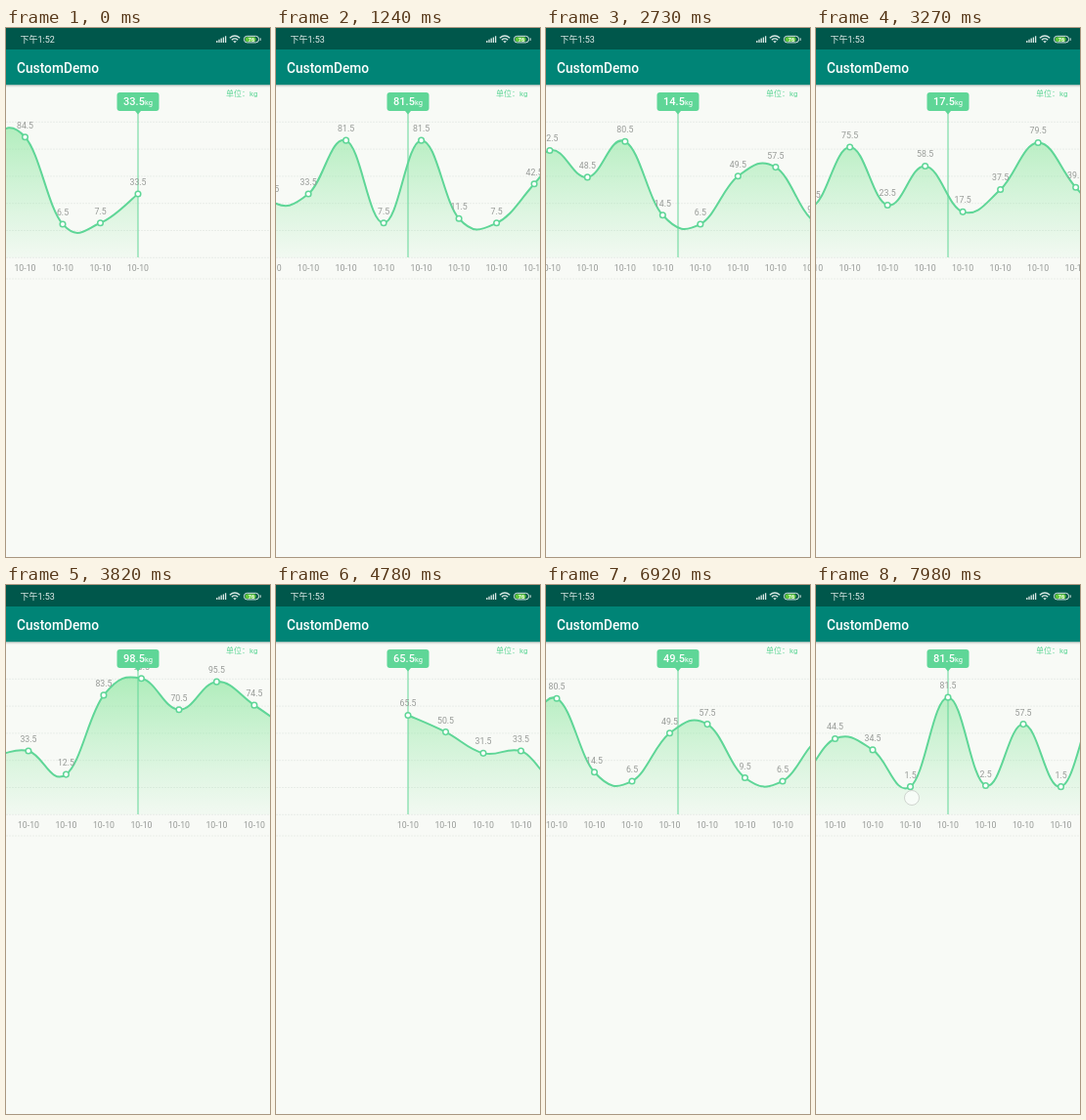
Recreate the animation shown at these times as an HTML page. Size 270 by 542 pixels, loop 8000 ms.

```html
<!DOCTYPE html>
<html lang="zh">
<head>
<meta charset="utf-8">
<title>CustomDemo</title>
<style>
  html, body { margin: 0; width: 100%; height: 100%; overflow: hidden; background: #f8faf6; }
  svg { display: block; width: 100%; height: 100%; }
  text { font-family: Roboto, "Noto Sans CJK SC", "Noto Sans CJK", sans-serif; }
  .label { font-size: 8.75px; fill: #979a97; text-anchor: middle; }
  .dot { fill: #fff; stroke: #5fd697; stroke-width: 1.5; }
  .curve { fill: none; stroke: #5fd697; stroke-width: 2; stroke-linejoin: round; }
  .grid { stroke: #e3e9e2; stroke-width: .7; stroke-dasharray: 2 1; }
</style>
</head>
<body>
<svg viewBox="0 0 270 542" preserveAspectRatio="none">
  <defs>
    <linearGradient id="fade" gradientUnits="userSpaceOnUse" x1="0" y1="96" x2="0" y2="235">
      <stop offset="0" stop-color="#7fe494" stop-opacity=".6"/>
      <stop offset="1" stop-color="#8ee8a4" stop-opacity=".06"/>
    </linearGradient>
    <linearGradient id="shade" x1="0" y1="0" x2="0" y2="1">
      <stop offset="0" stop-opacity=".2"/>
      <stop offset="1" stop-opacity="0"/>
    </linearGradient>
  </defs>

  <rect width="270" height="542" fill="#f8faf6"/>
  <g id="grid"></g>

  <g class="scroll"><path id="area" fill="url(#fade)"/></g>
  <path d="M135 87V235" stroke="#5fd697" stroke-width="1.5" opacity=".65"/>
  <g class="scroll" id="chart"><path id="curve" class="curve"/></g>

  <rect x="113.5" y="66" width="43" height="19" rx="3" fill="#5fd697"/>
  <path d="M132 85h6l-3 3.5z" fill="#5fd697"/>
  <text x="135" y="79.3" fill="#fff" text-anchor="middle" font-size="11" font-weight="500"><tspan id="value">33.5</tspan><tspan font-size="7.5" font-weight="400">kg</tspan></text>
  <text x="225" y="70" font-size="8" fill="#5fd697">单位：kg</text>

  <circle id="touch" cx="98" cy="218" r="7.5" fill="#fff" fill-opacity=".6" stroke="#c6cbc6" stroke-width=".8"/>

  <rect y="58" width="270" height="3" fill="url(#shade)"/>
  <rect y="21" width="270" height="37.2" fill="#008476"/>
  <rect width="270" height="22" fill="#00574b"/>
  <text x="11" y="45.9" fill="#fff" font-size="13.75" font-weight="500">CustomDemo</text>
  <text id="clock" x="14.5" y="15" fill="#e6efed" font-size="9">下午1:52</text>

  <g stroke="#dce9e6" fill="none">
    <path d="M215.8 15v-2M218 15v-3.2M220.2 15v-4.4M222.4 15v-5.6M224.6 15v-6.8" stroke-width="1.3"/>
    <path d="M228.8 10.2q5.2-4.4 10.4 0M230.8 12.2q3.2-2.6 6.4 0" stroke-width="1.3"/>
    <path d="M232.2 13.3h3.6L234 15.4z" fill="#dce9e6" stroke="none"/>
    <rect x="243.5" y="8.3" width="15" height="6.6" rx="3" stroke-width="1"/>
    <path d="M260.2 10.3v2.6" stroke-width="1"/>
  </g>
  <rect x="244.6" y="9.2" width="11" height="4.8" rx="2" fill="#62c93c"/>
  <text x="251" y="13.6" fill="#fff" font-size="5.5" font-weight="700" text-anchor="middle">76</text>
</svg>
<script>
const LOOP = 8000, COUNT = 51, STEP = 38.5, CENTER = 135, BASE = 235, BEND = .2;

// Labelled readings by first item; the items between come from the generator
const stretches = {
  0: [65, 50, 31, 33, 12, 83, 98, 70, 95, 74],
  12: [75, 23, 58, 17, 37, 79, 39],
  21: [72, 48, 80, 14, 6, 49, 57, 9],
  30: [44, 34, 1, 81, 2, 57, 1, 75, 27, 33, 81, 7, 81, 11, 7, 42],
  47: [84, 6, 7, 33]
};
const generated = i => (14 * i * i + 78 * i + 70) % 100;

const kilos = Array.from({ length: COUNT }, (_, i) => generated(i));
for (const first in stretches) kilos.splice(first, stretches[first].length, ...stretches[first]);

// Key moments of the scroll: time in ms and the item at the centre line
const keys = [[690, 50], [1240, 41.66], [2730, 24.42], [3820, 5.92], [4780, 0], [5570, 2.4], [6160, 15.04], [7800, 33]];

const $ = id => document.getElementById(id);
const near = (list, i) => list[Math.max(0, Math.min(list.length - 1, i))];
const reading = i => `${kilos[i]}.5`;

function add(parent, tag, attrs, text = '') {
  const node = document.createElementNS('http://www.w3.org/2000/svg', tag);
  for (const key in attrs) node.setAttribute(key, attrs[key]);
  node.textContent = text;
  parent.append(node);
}

const addGridLine = y => add($('grid'), 'path', { class: 'grid', d: `M0 ${y}H270` });
for (let i = 0; i < 6; i++) addGridLine(96.3 + i * 27.8);
addGridLine(257);

const points = kilos.map((v, i) => [i * STEP, 207.8 - v * 1.1436]);

// Smooth curve whose tangents follow the neighbouring points
function smoothPath() {
  let d = `M${points[0]}`;
  for (let i = 0; i < COUNT - 1; i++) {
    const [a, b, c, e] = [-1, 0, 1, 2].map(k => near(points, i + k));
    const c1 = b.map((p, k) => p + (c[k] - a[k]) * BEND);
    const c2 = c.map((p, k) => p - (e[k] - b[k]) * BEND);
    d += `C${c1} ${c2} ${c}`;
  }
  return d;
}

const path = smoothPath();
$('curve').setAttribute('d', path);
$('area').setAttribute('d', `${path}V${BASE}H0Z`);
points.forEach(([x, y], i) => {
  add($('chart'), 'circle', { class: 'dot', cx: x, cy: y, r: 2.8 });
  add($('chart'), 'text', { class: 'label', x, y: y - 9 }, reading(i));
  add($('chart'), 'text', { class: 'label', x, y: 249.2 }, '10-10');
});

// Mean speed between two keys, and the speed at a key: zero at ends and turns
function pace(i) {
  const [t0, p0] = near(keys, i), [t1, p1] = near(keys, i + 1);
  return t1 > t0 ? (p1 - p0) / (t1 - t0) : 0;
}
function speedAt(i) {
  const before = pace(i - 1), after = pace(i);
  const isEnd = i === 0 || i === keys.length - 1;
  return isEnd || before * after <= 0 ? 0 : 2 * before * after / (before + after);
}

function positionAt(t) {
  const next = keys.findIndex(([time]) => time > t);
  if (next < 1) return next ? keys[keys.length - 1][1] : keys[0][1];
  const [t0, p0] = keys[next - 1], [t1, p1] = keys[next];
  const span = t1 - t0, u = (t - t0) / span, w = 1 - u;
  return p0 * (1 + 2 * u) * w * w + p1 * u * u * (3 - 2 * u)
    + span * u * w * (speedAt(next - 1) * w - speedAt(next) * u);
}

const layers = document.querySelectorAll('.scroll');

function draw(now) {
  const t = now % LOOP, position = positionAt(t);
  const shift = `translate(${CENTER - position * STEP} 0)`;
  layers.forEach(layer => layer.setAttribute('transform', shift));
  $('value').textContent = reading(Math.round(position));
  $('clock').textContent = t < 690 ? '下午1:52' : '下午1:53';
  $('touch').style.display = t >= 7960 ? '' : 'none';
}

const start = performance.now();
function tick() {
  draw(performance.now() - start);
  requestAnimationFrame(tick);
}
tick();
</script>
</body>
</html>
```
